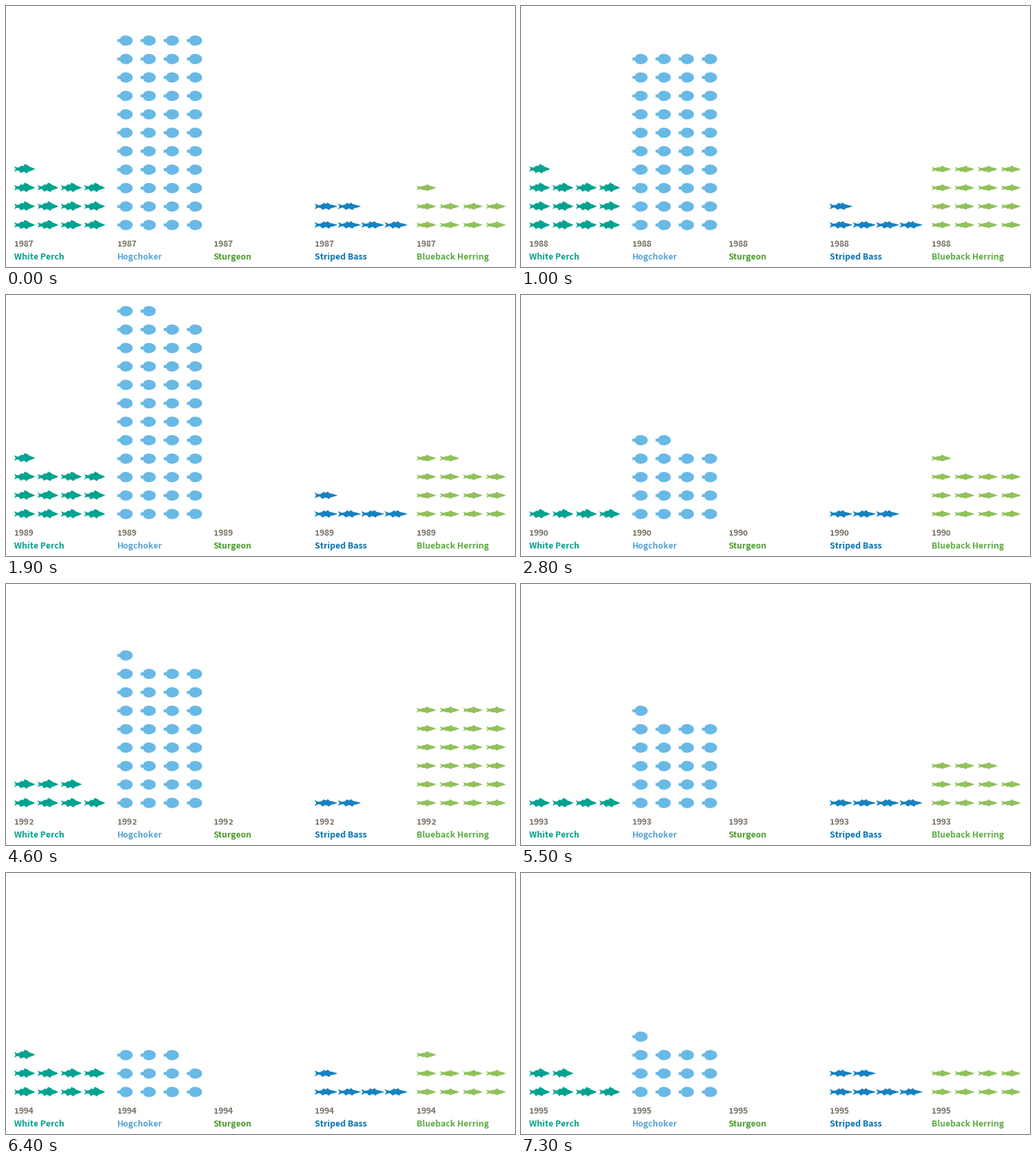
A matplotlib script for the animation above (8000 ms loop, 750 by 385 pixels).

```python
import numpy as np
import matplotlib.pyplot as plt
from matplotlib.animation import FuncAnimation
from matplotlib.collections import PolyCollection

W, H, DPI = 750, 385, 100
STEP, LOOP = 100, 8000
BASE_Y = 323
YEAR_COLOR = "#7b7366"
LABEL_FONT = "Noto Sans CJK JP"


def bump(u, center, width):
    return np.clip(1 - np.abs(u - center) / width, 0, 1)


def fish(length, depth, tail, dorsal, belly):
    """Lens-shaped body, forked tail and triangular fins given as (place, height)."""
    u = np.linspace(0, 1, 61)
    v = np.clip((u - 0.12) / 0.88, 0, 1)
    body = 0.9 + (depth - 0.9) * np.sin(np.pi * v ** 0.9) - 0.9 * v ** 4
    body += tail * bump(u, 0, 0.2)
    top = body + sum(h * bump(u, c, 0.09) for c, h in dorsal)
    low = body + sum(h * bump(u, c, 0.09) for c, h in belly)
    x = u * length
    upper, lower = np.c_[x, -top], np.c_[x, low][::-1]
    return np.vstack([upper, lower, [(0.07 * length, 0)]])


def flatfish(length, depth):
    """Egg-shaped body with a stubby notched tail."""
    a = np.linspace(-0.92, 0.92, 49) * np.pi
    r = 0.41 * length
    x = length - r + r * np.cos(a)
    y = depth * np.sign(np.sin(a)) * np.abs(np.sin(a)) ** 0.9 * (1 - 0.1 * np.cos(a))
    return np.vstack([np.c_[x, y], [(1.2, 2.2), (0.2, 1.4), (1, 0), (0.2, -1.4), (1.2, -2.2)]])


def grid(shape, left, dx, dy, n):
    """Icons fill rows of four from the bottom up."""
    return [shape + (left + i % 4 * dx, BASE_Y - i // 4 * dy) for i in range(n)]


perch = fish(31, 4.4, 3.4, [(0.34, 1.4), (0.52, 3.4), (0.63, 2)], [(0.32, 2.6), (0.59, 2.4)])
bass = fish(34, 3.4, 3.6, [(0.4, 2.2), (0.57, 2.4)], [(0.35, 2.4), (0.62, 2.2)])
herring = fish(29, 3.5, 2.8, [(0.55, 2)], [(0.3, 0.6), (0.55, 1.4)])
hogchoker = flatfish(23, 7.5)

# name, left edge, icon colour, label colour, icon, column and row pitch, count per year
SPECIES = [
    ("White Perch", 12, "#00a390", "#00a189", perch, 34.4, 27.5,
     (13, 13, 13, 4, 6, 7, 4, 9, 6)),
    ("Hogchoker", 163.6, "#68b9e6", "#5aa5d6", hogchoker, 34.1, 27.2,
     (44, 40, 46, 18, 26, 33, 21, 11, 13)),
    ("Sturgeon", 306, "#4c9c2e", "#4c9c2e", perch, 34.4, 27.4, (0,) * 9),
    ("Striped Bass", 454.6, "#1682c0", "#0071b2", bass, 34.4, 27.4,
     (6, 5, 5, 3, 3, 2, 4, 5, 6)),
    ("Blueback Herring", 605, "#91c15b", "#5aab41", herring, 34.2, 27.4,
     (9, 16, 14, 13, 30, 24, 11, 9, 8)),
]

fig = plt.figure(figsize=(W / DPI, H / DPI), dpi=DPI, facecolor="white")
ax = fig.add_axes([0, 0, 1, 1])
ax.set_xlim(0, W)
ax.set_ylim(H, 0)
ax.axis("off")


def put(x, y, s, px, color, ha="left"):
    return ax.text(x, y, s, fontsize=px * 72 / DPI, color=color, family=LABEL_FONT,
                   weight="bold", ha=ha, va="baseline")


def style_digit(text, d):
    """Old-style figures: 0, 1 and 2 are short, the rest are tall."""
    short = d in "012"
    text.set_text(d)
    text.set_family("DejaVu Sans" if short else LABEL_FONT)
    text.set_fontsize((10.2 if short else 12.4) * 72 / DPI)


groups, digits = [], []
for name, left, fill, ink, *_ in SPECIES:
    icons = PolyCollection([], facecolors=fill, edgecolors="none")
    ax.add_collection(icons, autolim=False)
    groups.append(icons)
    x = round(left)
    put(x - 0.4, 373.6, name, 12.4, ink)
    digits.append([put(x + 3.5 + 7 * i, 355.3, "", 12, YEAR_COLOR, "center") for i in range(4)])


def update(frame):
    t = frame * STEP
    k = 0 if t < 1000 else 1 + (t - 1000) // 900
    for (_, left, _, _, shape, dx, dy, counts), icons, row in zip(SPECIES, groups, digits):
        icons.set_verts(grid(shape, left, dx, dy, counts[k]))
        for text, d in zip(row, str(1987 + k)):
            style_digit(text, d)
    return groups + sum(digits, [])


anim = FuncAnimation(fig, update, frames=LOOP // STEP, interval=STEP,
                     repeat=True, repeat_delay=0, blit=False)
plt.show()
```
